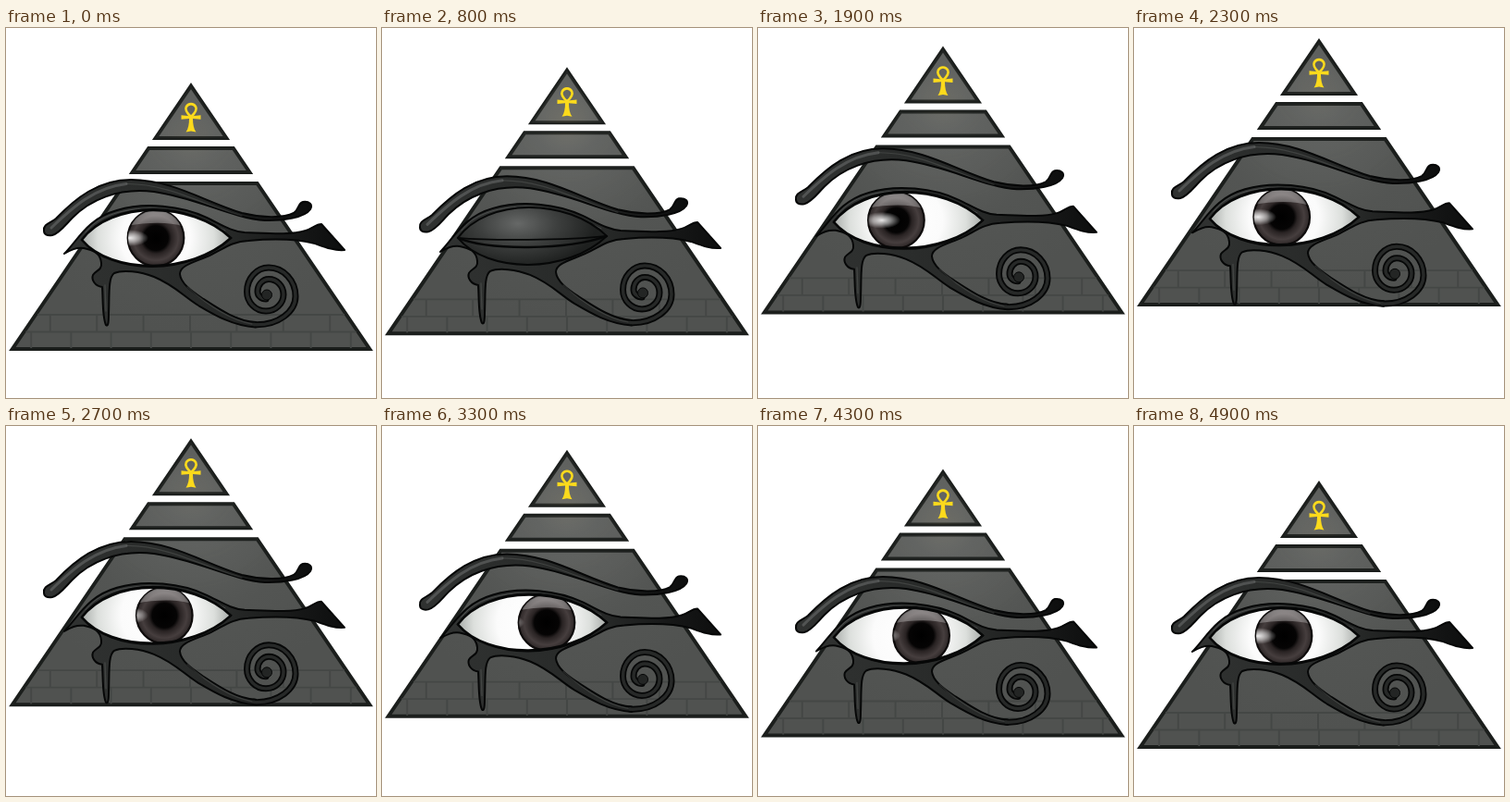
Write an HTML page that moves like this. It is 400 px wide and 400 px high and loops after 5 s.

```html
<!DOCTYPE html>
<html lang="en">
<head>
<meta charset="utf-8">
<title>Eye and pyramid</title>
<style>
html, body { margin: 0; width: 100%; height: 100%; overflow: hidden; background: #fff; }
svg { display: block; width: 100vw; height: 100vh; }
.tier { stroke: #1b1e1c; stroke-width: 4; stroke-miterlimit: 10; }
.band { fill: url(#metal); stroke: #060707; stroke-width: 2; stroke-linejoin: round; }
.line { fill: none; stroke: #060707; stroke-linecap: round; }
.shine { fill: none; stroke: #747776; stroke-linecap: round; }
</style>
</head>
<body>
<svg viewBox="0 0 400 400" xmlns="http://www.w3.org/2000/svg">
  <defs>
    <radialGradient id="stone" gradientUnits="userSpaceOnUse" cx="200" cy="130" r="200">
      <stop offset="0" stop-color="#626462"/>
      <stop offset=".6" stop-color="#535553"/>
      <stop offset="1" stop-color="#505250"/>
    </radialGradient>
    <radialGradient id="warm" gradientUnits="userSpaceOnUse" cx="200" cy="117" r="36">
      <stop offset="0" stop-color="#d0aa48"/>
      <stop offset=".45" stop-color="#c4a868" stop-opacity=".6"/>
      <stop offset="1" stop-color="#b8b09a" stop-opacity="0"/>
    </radialGradient>
    <radialGradient id="pale" gradientUnits="userSpaceOnUse" cx="200" cy="110" r="130">
      <stop offset="0" stop-color="#b8b8b0" stop-opacity=".6"/>
      <stop offset="1" stop-color="#b8b8b0" stop-opacity="0"/>
    </radialGradient>
    <linearGradient id="metal">
      <stop offset="0" stop-color="#303231"/>
      <stop offset=".6" stop-color="#262827"/>
      <stop offset=".85" stop-color="#151616"/>
      <stop offset="1" stop-color="#0d0e0e"/>
    </linearGradient>
    <radialGradient id="lidFill" gradientUnits="userSpaceOnUse" cx="147" cy="212" r="85" gradientTransform="translate(0 97) scale(1 .55)">
      <stop offset="0" stop-color="#666867"/>
      <stop offset=".5" stop-color="#3d3f3e"/>
      <stop offset="1" stop-color="#1e201f"/>
    </radialGradient>
    <radialGradient id="white" gradientUnits="userSpaceOnUse" cx="162" cy="227" r="84">
      <stop offset="0" stop-color="#fff"/>
      <stop offset=".45" stop-color="#fbfbfb"/>
      <stop offset=".75" stop-color="#dcdfdc"/>
      <stop offset="1" stop-color="#9da19e"/>
    </radialGradient>
    <radialGradient id="iris">
      <stop offset="0" stop-color="#000"/>
      <stop offset=".44" stop-color="#050404"/>
      <stop offset=".56" stop-color="#292323"/>
      <stop offset=".8" stop-color="#463e3e"/>
      <stop offset="1" stop-color="#2c2626"/>
    </radialGradient>
    <radialGradient id="spark">
      <stop offset="0" stop-color="#fff" stop-opacity=".9"/>
      <stop offset=".5" stop-color="#fff" stop-opacity=".5"/>
      <stop offset="1" stop-color="#fff" stop-opacity="0"/>
    </radialGradient>
    <linearGradient id="gloss" x1="0" y1="0" x2="0" y2="1">
      <stop offset="0" stop-color="#fff" stop-opacity=".5"/>
      <stop offset="1" stop-color="#fff" stop-opacity=".25"/>
    </linearGradient>
    <clipPath id="slit"><path id="slitShape"/></clipPath>
    <clipPath id="irisClip"><circle id="irisEdge" cy="227" r="30"/></clipPath>
  </defs>

  <g id="pyramid">
    <g id="tiers" fill="url(#stone)"></g>
    <path id="bricks" fill="none" stroke="#444745" stroke-width="1.900"/>
    <g id="glow"></g>
    <g fill="#fcda1c">
      <path d="M200 96C195 91.500 193.500 88 194.800 85.300C197 81 203 81 205.200 85.300C206.500 88 205 91.500 200 96Z" fill="none" stroke="#fcda1c" stroke-width="2.600"/>
      <path d="M189.500 94.200L199 95.200H201L210.500 94.200V98.700L202 97.900C202 104 203 109 205.500 112.500L200 111.500L194.500 112.500C197 109 198 104 198 97.900L189.500 98.700Z"/>
    </g>
  </g>

  <g id="eye">
    <path id="spiral" class="line" stroke-width="7"/>
    <path class="band" d="M63 244C78 229 88 206 120 197C150 188 190 192 217 205C232 212 243 220 258 221C285 222 308 224 324 219C331 217 335 212 341 212L366 240C355 241 345 237 334 233C310 227 285 228 262 230C245 231 238 237 222 245C205 253 188 256 188 266C189 276 200 284 212 292C232 305 250 317 270 318V323.500C245 322 225 310 208 300C192 290 182 278 160 269C145 263 126 261 117 265C110 270 112 290 111 310C111 320 110 323 108 321C104 312 105 295 104 280C96 279 92 272 94 267C97 262 104 262 103 254C102 243 94 240 84 238C76 237 70 240 63 244Z"/>
    <path id="spiralCore" fill="none" stroke="#272928" stroke-width="3.400" stroke-linecap="round"/>
    <circle cx="282" cy="288.500" r="5.500" fill="#232524" stroke="#060707"/>
    <path class="shine" stroke-width="1" opacity=".45" d="M86 221C98 205 120 196 155 195C190 195 215 209 237 219"/>
    <path class="shine" stroke-width="1.300" opacity=".3" d="M196 280C214 296 240 315 266 320M107 278L108 306"/>
    <path id="lid" fill="url(#lidFill)" stroke="#060707" stroke-width="2"/>
    <path id="crease" class="line" stroke-width="1.700"/>
    <g id="ball" clip-path="url(#slit)">
      <rect x="70" y="185" width="185" height="85" fill="url(#white)"/>
      <circle id="irisDisc" cy="227" r="30.300" fill="url(#iris)" stroke="#0e0b0b" stroke-width="2.200"/>
      <g clip-path="url(#irisClip)">
        <path id="glossShape" fill="url(#gloss)"/>
        <ellipse cx="134" cy="227" rx="20" ry="9" fill="url(#spark)"/>
      </g>
    </g>
    <path id="rim" class="line" stroke-width="2.500"/>
  </g>

  <g id="brow">
    <path class="band" d="M41 219C40 212 48 211 54 206C75 184 100 164 135 164C180 164 215 188 255 200C275 205 300 206 311 200C317 196 315 190 321 188C328 187 332 191 329 196C323 205 300 208.500 280 208C245 206 205 183 160 177C120 172 90 187 72 205C64 213 58 222 50 224C44 225 41 223 41 219Z"/>
    <path class="shine" stroke-width="3" opacity=".5" d="M49 216C72 194 96 172 130 168.500"/>
    <path class="shine" stroke-width="1.200" opacity=".3" d="M130 168.500C175 168 215 192 255 203"/>
  </g>
</svg>
<script>
const $ = id => document.getElementById(id);
const FRAMES = 50, STEP = 100, CYCLE = 49;

const half = y => (y - 62.6) * 0.679;
const tierPath = (top, base) =>
  `M${200 - half(top)} ${top}H${200 + half(top)}L${200 + half(base)} ${base}H${200 - half(base)}Z`;
const tiers = [[62.6, 119], [130, 156], [168, 347]].map(t => tierPath(...t));
$('tiers').innerHTML = tiers.map(d => `<path class="tier" d="${d}"/>`).join('');
$('glow').innerHTML = ['warm', 'pale'].map(g =>
  tiers.map(d => `<path d="${d}" fill="url(#${g})"/>`).join('')).join('');

let wall = '';
for (const y of [310, 328.5]) wall += `M${202 - half(y)} ${y}H${198 + half(y)}`;
for (let k = -3; k <= 3; k++) wall += `M${199 + k * 50.4} 310V328`;
for (let k = -4; k <= 4; k++) wall += `M${200 + k * 43.2} 329V346`;
$('bricks').setAttribute('d', wall);

// Quarter turns from the tail inward.
const turns = [[313, 290], [284, 259], [260.5, 285], [281, 306], [300, 288], [284, 271.5], [272, 285], [281, 293]];
let [px, py] = [271, 320.8];
let curl = `M268 320.5L${px} ${py}`;
for (const [x, y] of turns) {
  curl += `A${Math.abs(x - px)} ${Math.abs(y - py)} 0 0 0 ${x} ${y}`;
  [px, py] = [x, y];
}
$('spiral').setAttribute('d', curl);
$('spiralCore').setAttribute('d', curl);

const pull = mid => 228 + (mid - 228) * 4 / 3;
const arc = mid => `M82 229C114 ${pull(mid)} 200 ${pull(mid)} 243 227`;
const lens = (top, bottom) => `${arc(top)}C200 ${pull(bottom)} 114 ${pull(bottom)} 82 229Z`;
$('lid').setAttribute('d', lens(196, 258));

const ease = (x, a, b) => {
  const u = Math.min(1, Math.max(0, (x - a) / (b - a)));
  return (1 - Math.cos(Math.PI * u)) / 2;
};
const bump = (x, mid, width) => Math.exp(-(((x - mid) / width) ** 2));
const lift = (id, y) => $(id).setAttribute('transform', `translate(0 ${-y})`);

function draw(ms) {
  const i = Math.floor(ms / STEP) % FRAMES % CYCLE;
  const m = Math.min(i, CYCLE - i);
  const rise = ease(m, 4, 24.5);

  lift('pyramid', m * 50 / 24);
  lift('eye', 23 * rise);
  lift('brow', 40.5 * rise);
  $('glow').setAttribute('opacity', 0.08 + 0.55 * bump(i, 13, 3.5) + 0.2 * bump(i, 38, 4));

  const shut = ease(i, 1, 7) * (1 - ease(i, 9, 17));
  const top = 197 + 42 * shut, bottom = 257 - 18 * shut;
  const slit = lens(top, bottom);
  $('slitShape').setAttribute('d', slit);
  $('rim').setAttribute('d', slit);
  $('crease').setAttribute('d', arc(top - 8 * shut));
  $('ball').setAttribute('visibility', shut > 0.98 ? 'hidden' : 'visible');

  const back = i < 25 ? i + CYCLE : i;
  const x = i >= 15 && i < 41
    ? 146 + 32 * ease(i, 15.5, 32)
    : 178 - 32 * ease(back, 40.8, 57.2);
  $('irisDisc').setAttribute('cx', x);
  $('irisEdge').setAttribute('cx', x);
  $('glossShape').setAttribute('d',
    `M${x - 31} 190H${x + 31}V215C${x + 15} 209 ${x - 10} 210 ${x - 31} 214Z`);
}

const start = performance.now();
function tick() {
  draw((performance.now() - start) % (FRAMES * STEP));
  requestAnimationFrame(tick);
}
draw(0);
requestAnimationFrame(tick);
</script>
</body>
</html>
```
